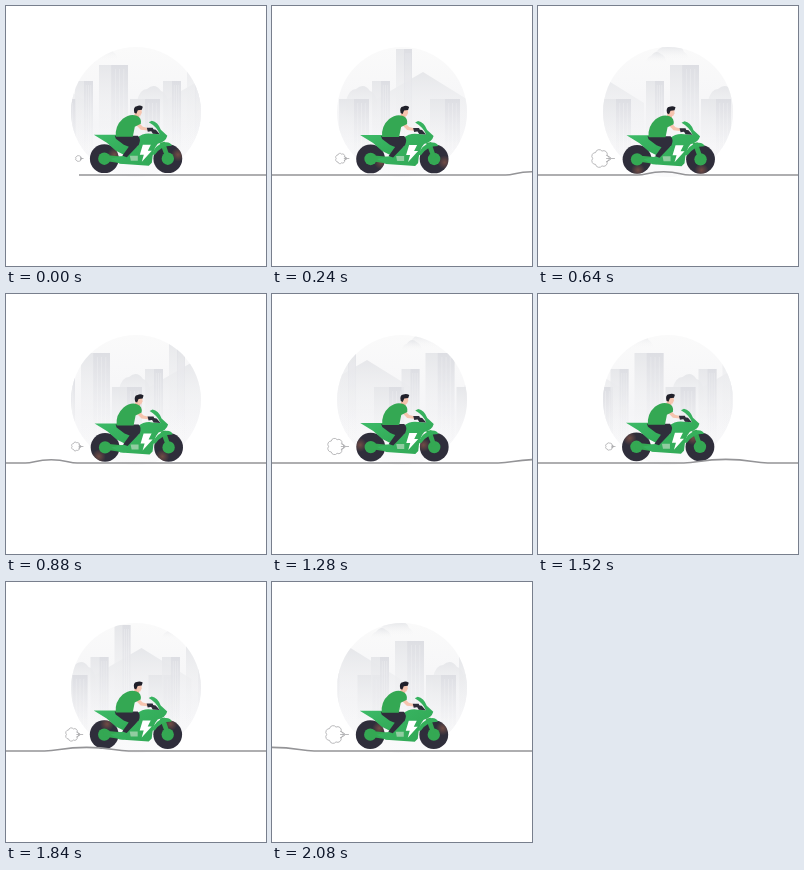
Write an HTML page that moves like this. It is 260 px wide and 260 px high and loops after 2.16 s.

```html
<!DOCTYPE html>
<html lang="en">
<head>
<meta charset="utf-8">
<title>Electric motorbike ride</title>
<style>
  html, body { margin: 0; width: 100%; height: 100%; overflow: hidden; background: #fff; }
  svg { display: block; width: 100vw; height: 100vh; }
</style>
</head>
<body>
<svg viewBox="0 0 260 260">
  <defs>
    <linearGradient id="sky" x2="0" y2="1">
      <stop stop-color="#fafafa"/><stop offset=".6" stop-color="#f5f5f7"/><stop offset="1" stop-color="#fafafb"/>
    </linearGradient>
    <linearGradient id="wall" x2="0" y2="1">
      <stop stop-color="#e6e7ea"/><stop offset="1" stop-color="#f8f8f9" stop-opacity="0"/>
    </linearGradient>
    <linearGradient id="shade" x2="0" y2="1">
      <stop stop-color="#dddee3"/><stop offset="1" stop-color="#f6f6f8" stop-opacity="0"/>
    </linearGradient>
    <linearGradient id="haze" x2="0" y2="1">
      <stop stop-color="#e6e7ea"/><stop offset="1" stop-color="#f8f8f9" stop-opacity="0"/>
    </linearGradient>
    <linearGradient id="paint" x2="1" y2="1">
      <stop stop-color="#3dbb68"/><stop offset="1" stop-color="#2fa653"/>
    </linearGradient>
    <radialGradient id="glow">
      <stop stop-color="#7d5147" stop-opacity=".85"/><stop offset="1" stop-color="#7d5147" stop-opacity="0"/>
    </radialGradient>
    <clipPath id="disc"><circle cx="130" cy="106" r="65"/></clipPath>
    <clipPath id="tyre"><circle r="14.3"/></clipPath>
    <g id="block"></g>
    <g id="wheel">
      <circle r="14.4" fill="#2f2e3b"/>
      <g clip-path="url(#tyre)"><circle class="spin" cx="11" r="7" fill="url(#glow)"/></g>
      <circle r="6.2" fill="#34a853"/>
    </g>
  </defs>

  <circle cx="130" cy="106" r="65" fill="url(#sky)"/>
  <g id="city" clip-path="url(#disc)"></g>

  <g id="puff" fill="#fff" stroke="#a9a9ab" stroke-linejoin="round" stroke-linecap="round">
    <path id="cloud"/>
    <path d="M-9-3L-5-1M-9 0H-1M-9 3L-5 1" fill="none"/>
  </g>

  <g id="ride">
    <use href="#wheel" x="98.500" y="153"/>
    <use href="#wheel" x="162" y="153"/>
    <path d="M97 149L118 151V158L98 155Z" fill="#34a853"/>
    <path d="M154 137L159 136L164 151L160 153Z" fill="#34a853"/>
    <path d="M88 129H112L132 133L122 151L110 145L101 137Z" fill="url(#paint)"/>
    <path d="M105 153L118 150L132 140L131 132Q138 126.500 146 128L154 128.500Q151 121 143 116.500L146 115Q152 116 155 124L161.500 130Q160 136 152 138Q147 143 146 157L143 160L114 158Z" fill="url(#paint)"/>
    <path d="M146 149Q149 139 159 136.500Q165 136 166 140Q155 140 149 149Z" fill="#35b05b"/>
    <path d="M137 139H145L142 145H146L136 156L138 149H134Z" fill="#fff"/>
    <path d="M124 150H132V155H125Z" fill="#91cda1"/>
    <path d="M144 123L150 124L154 128.500L147 128Z" fill="#2d2c38"/>

    <path d="M109 130H132Q135.500 133 133 139L121 151.500L116.500 150L123 141L118 139L110 133Z" fill="#2f2e3b"/>
    <path d="M129 106H134L133 114H128Z" fill="#f3b9a3"/>
    <path d="M130 102H135.500L136 107L134.500 110L131 109Z" fill="#f6c4af"/>
    <path d="M128.500 107Q127 101 131 100.500Q134 99 137 101L136 104L132 104.500L130.500 108Z" fill="#20202a"/>
    <path d="M128 117L133 117L137 121L145 123L144 125L135 124Z" fill="#f6c4af"/>
    <path d="M110 131Q109 120 117 113Q124 107.500 131 110Q136 112 135 118L129 121L127 131Z" fill="#34a853"/>
    <path d="M141 122L147 122L148 125L142 126Z" fill="#2d2c38"/>
  </g>

  <path id="road" fill="none" stroke="#949497" stroke-width="1.6"/>
</svg>

<script>
const LOOP = 2160, STEP = 80, PUFF = 720;
const CITY_SPEED = 0.2375, ROAD_SPEED = 0.335, GROUND = 169;
const BLOCK_STARTS = [-82, 93, 284, 457.5, 617];
const BUMPS = [{ at: 340, half: 26, rise: 3.2 }, { at: 697, half: 42, rise: 3.6 }];
const $ = id => document.getElementById(id);

function building(x, top, width, split = 0.5) {
  const rect = (left, w, fill) =>
    `<rect x="${left}" y="${top}" width="${w}" height="${158 - top}" fill="url(#${fill})"/>`;
  let lines = '';
  for (let i = 1; i < 4; i++) lines += `M${x + width * (split + i * (1 - split) / 4)} ${top + 4}V145`;
  return rect(x, width, 'wall') + rect(x + width * split, width * (1 - split), 'shade') +
    `<path d="${lines}" stroke="#fff" stroke-opacity=".4" stroke-width=".6"/>`;
}

// A ring of round lobes around the middle of the exhaust cloud.
function cloudPath(lobes = 7, radius = 7.6) {
  let d = '';
  for (let i = 0; i <= lobes; i++) {
    const a = i / lobes * 2 * Math.PI + 0.45;
    d += `${i ? 'A3.6 3.6 0 0 1 ' : 'M'}${-15.2 + radius * Math.cos(a)} ${radius * Math.sin(a)}`;
  }
  return d;
}

const hill = d => `<path d="${d}" fill="url(#haze)"/>`;

$('block').innerHTML =
  hill('M-14 54V46Q-8 38 2 41Q12 38 14 46Q18 48 19 54Z') +
  hill('M-25 57Q-22 50-19 50Q-14 43-9 48Q-5 49-3 57Z') +
  hill('M65 95L115 66L165 97V150H65Z') +
  hill('M38 95Q41 83 48 83Q56 76 62 85Q67 86 69 95V130H38Z') +
  building(88, 43, 16) + building(122, 93, 30) + building(-24, 75, 18) +
  building(64, 75, 18) + building(31, 93, 30) + building(0, 59, 29, 0.42);

$('city').innerHTML = BLOCK_STARTS.map(x => `<use href="#block" x="${x}"/>`).join('');
$('cloud').setAttribute('d', cloudPath());
const blocks = [...$('city').children];
const glow = document.querySelector('.spin');

function roadPath(shift) {
  let d = `M${Math.max(0, 73 - shift)} ${GROUND}`;
  for (const { at, half, rise } of BUMPS) {
    const x = at - shift, foot = half * 0.65, crest = half * 0.6, top = GROUND - rise;
    if (x + half < 0) continue;
    // A bump leaving on the left must begin outside the stage.
    if (x - half < 0) d = `M${x - half} ${GROUND}`;
    d += `L${x - half} ${GROUND}C${x - foot} ${GROUND} ${x - crest} ${top} ${x} ${top}` +
      `S${x + foot} ${GROUND} ${x + half} ${GROUND}`;
  }
  return d + `L${Math.max(1000 - shift, 270)} ${GROUND}`;
}

function draw(time) {
  const t = Math.floor(time % LOOP / STEP) * STEP;
  blocks.forEach((block, i) => block.setAttribute('x', BLOCK_STARTS[i] - CITY_SPEED * t));
  $('road').setAttribute('d', roadPath(ROAD_SPEED * t));
  glow.setAttribute('transform', `rotate(${t / LOOP * 360 - 22})`);
  const lift = 0.5 + 0.5 * Math.cos((t - 1900) / LOOP * 2 * Math.PI);
  $('ride').setAttribute('transform', `translate(${0.6 - 0.9 * lift} ${0.4 - 0.8 * lift})`);
  const scale = (8 + 0.025 * (t % PUFF)) / 24;
  $('puff').setAttribute('transform', `translate(77.5 152.5) scale(${scale})`);
  $('puff').setAttribute('stroke-width', 0.8 / scale);
}

const start = performance.now();
function tick() {
  draw(performance.now() - start);
  requestAnimationFrame(tick);
}
tick();
</script>
</body>
</html>
```
